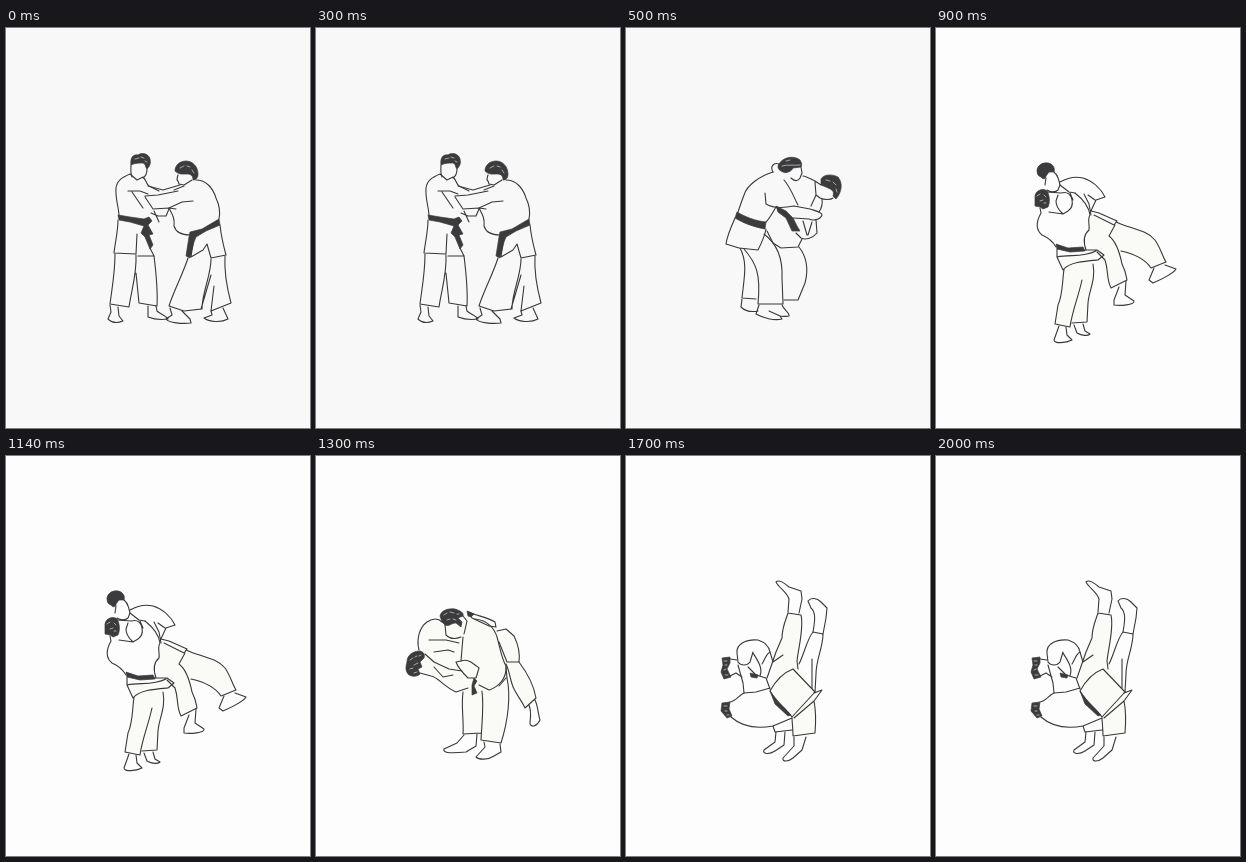
Animation, 304 px wide and 400 px high, one loop 2200 ms. Source, as an HTML page:

```html
<!DOCTYPE html>
<html lang="en">
<head>
<meta charset="utf-8">
<title>Judo throw</title>
<style>
html, body { margin: 0; width: 100%; height: 100%; overflow: hidden; background: #f8f8f8; }
svg { display: block; width: 100%; height: 100%; }
.line { fill: none; stroke: #38383a; stroke-width: 1.1; stroke-linecap: round; stroke-linejoin: round; }
.ink { fill: #3b3b3e; stroke: #3b3b3e; stroke-width: .7; stroke-linejoin: round; }
.tint { fill: #fafaf6; }
.fleck { fill: none; stroke: #c4c4c4; stroke-width: .8; stroke-linecap: round; }
</style>
</head>
<body>
<svg id="stage" viewBox="0 0 304 400"></svg>
<script>
const NS = 'http://www.w3.org/2000/svg';
const stage = document.getElementById('stage');

// Each pose: hold time, paper colour, then [style, path] strokes from back to front.
const poses = [
  { hold: 500, paper: '#f8f8f8', art: [
    // left fighter
    ['ink', 'M125 137C124 130 127 126 132 127C136 124 143 126 144 131C145 135 144 138 141 141C139 139 140 136 137 135C133 135 129 135 125 137Z'],
    ['fleck', 'M129 131l4 -1M135 129l3 1M139 133l2 1'],
    ['line', 'M125 137C125 142 124 145 126 149M141 141C141 145 140 148 137 150'],
    ['line', 'M124 146C117 149 111 152 110 160C109 170 113 180 113 188M124 146L131 152L137 149C141 153 140 156 143 158L153 163'],
    ['line', 'M122 163L134 163L142 166M126 164L137 180M142 158L157 162L174 157M139 168L152 167L172 163M139 169L147 181L163 180L170 181M148 183L153 194M145 185L152 188L160 188L163 181'],
    ['ink', 'M112 187L124 189L138 191L143 189L146 193L142 197L147 206L143 207L147 217L144 221L139 209L135 205L138 198L124 194L113 192Z'],
    ['line', 'M112 192C112 204 109 215 108 225L130 226L131 206M144 220L148 228L132 228'],
    ['line', 'M109 226C109 245 106 260 104 276L123 279C125 264 131 246 130 227M130 245L133 275L151 278C152 260 150 244 148 228'],
    ['line', 'M104 277L105 284L102 291C106 295 112 295 117 293L113 288L112 279M142 278L142 289C147 291 155 292 162 291C161 288 154 286 151 283L150 278'],
    // right fighter
    ['ink', 'M169 143C169 137 174 133 180 133C187 133 192 139 192 146C192 150 190 152 187 152C187 148 185 146 181 146C177 146 173 147 169 143Z'],
    ['fleck', 'M174 140l4 -2M181 138l3 1M186 142l2 3'],
    ['line', 'M172 147C171 151 170 152 172 153L173 156L178 157L186 152M190 152C200 152 207 160 210 170C214 178 214 186 213 191'],
    ['line', 'M178 158L168 162M187 173L176 174L163 180C166 186 169 190 168 198C170 205 177 207 184 207'],
    ['ink', 'M213 191L214 197L200 203L190 209L188 214L184 230L180 228L183 209L184 204L196 201Z'],
    ['line', 'M187 214L185 229L197 222L201 216L205 230L220 227C217 216 215 207 214 197'],
    ['line', 'M182 230C177 246 168 262 163 278L178 283L196 281C196 264 205 248 205 231M205 247L195 281L178 283M219 228C218 244 221 260 225 275L205 283L208 258'],
    ['line', 'M164 280L166 287L160 291C163 295 176 296 185 295L184 291L176 283M205 283L206 287L198 290C203 294 215 295 222 291L217 280']
  ] },
  { hold: 400, paper: '#f8f8f8', art: [
    ['ink', 'M153 136C157 129 168 127 174 132C176 135 176 138 175 139L167 140C166 143 160 146 157 144C152 142 151 139 153 136Z'],
    ['fleck', 'M156 138C162 136 168 138 174 137M160 133l4 -1'],
    ['ink', 'M195 151C198 146 206 146 212 149C217 155 216 164 210 171L207 168C209 162 204 161 200 159L195 157Z'],
    ['fleck', 'M200 152l4 1M207 154l3 3M210 161l1 3'],
    ['line', 'M175 139L176 145L174 150C172 154 168 153 165 150M153 136C147 134 144 139 147 144'],
    ['line', 'M195 157L189 153C183 150 179 148 177 148M207 170C205 172 198 172 194 170L190 167L185 178M189 154L190 167'],
    ['line', 'M147 144C134 148 121 157 118 167C115 175 113 181 111 187M158 152C165 160 168 170 172 177'],
    ['line', 'M139 165L140 176C148 181 158 180 168 178L184 181C190 183 196 184 196 187C194 192 187 193 183 191L167 190'],
    ['line', 'M196 171C197 177 195 181 193 184M190 192L191 205C186 211 179 212 175 210L170 205M177 193L181 207M186 194L182 207'],
    ['ink', 'M111 184C119 189 130 193 140 194L139 201C128 199 117 195 109 190Z'],
    ['ink', 'M150 178L160 183L167 190L171 198L174 203L166 203L160 190L152 184Z'],
    ['line', 'M109 190C105 199 101 208 100 216L113 220L132 222C136 214 139 207 140 201M140 194C144 190 147 184 150 179M141 203L147 215L155 220L172 219L176 211'],
    ['line', 'M114 220C122 235 118 250 116 270L130 271M118 221C130 235 135 245 132 276M138 206C150 215 157 230 156 250L157 276L132 276'],
    ['line', 'M173 219C180 228 183 240 179 255L172 272L158 272'],
    ['line', 'M116 271L115 279C120 284 127 284 132 283M133 277L130 286C137 290 148 293 156 291L154 288L143 283M156 277C158 282 164 285 163 288C160 289 156 288 154 288']
  ] },
  { hold: 400, paper: '#fdfdfd', art: [
    ['tint', 'M154 187L178 194C195 200 215 205 220 214L230 234L215 240C205 230 195 225 183 222L191 252L175 260L152 212Z'],
    ['tint', 'M121 230L160 222L158 238L151 294L119 296L127 242Z'],
    // thrown fighter
    ['ink', 'M101 142C102 136 109 133 115 136C118 138 119 141 118 144L113 144L110 148C110 151 107 152 105 149C102 148 101 146 101 142Z'],
    ['line', 'M118 144C122 147 122 150 123 153L124 157L122 162C119 165 114 164 111 162M110 150L109 157'],
    ['line', 'M124 154C131 150 139 148 147 150C157 153 165 161 169 169L160 172L154 185M124 157L133 164L139 165M152 167L159 172M148 166L153 176L155 187'],
    ['line', 'M155 183L163 185L181 193M158 187L178 197L181 193'],
    ['line', 'M180 194C195 201 211 202 219 212C224 219 226 227 230 234L215 240C209 231 199 226 185 223'],
    ['line', 'M179 197L173 208C181 214 184 226 186 236C190 244 190 247 191 252L175 260C170 250 173 244 169 232L161 224'],
    ['line', 'M229 237L240 241C237 246 226 251 217 255L213 252L218 240M190 253L189 267L198 273C199 277 184 278 178 277L178 272L183 259'],
    // standing fighter
    ['ink', 'M99 168C100 162 107 160 111 163C114 168 114 175 112 179L107 181L104 179L99 178Z'],
    ['fleck', 'M101 168l3 -2M104 173l3 -1M108 167l2 2M108 175l2 0'],
    ['line', 'M111 164L125 165C132 163 135 167 136 172C137 177 135 181 132 183L127 186L113 184M122 167L120 173C120 180 124 183 127 186M134 165L137 172'],
    ['line', 'M104 180L105 185C100 194 100 202 106 207C113 210 117 214 120 219M139 165C148 172 153 180 154 187C151 192 154 197 153 202C148 206 147 213 150 222'],
    ['ink', 'M120 216L132 220L147 219L149 223L134 224L121 221Z'],
    ['line', 'M121 221L121 229L127 242C133 234 150 233 162 232L168 227L161 222L149 222M121 229C134 226 146 230 160 223'],
    ['line', 'M128 241C126 255 127 266 122 277L119 296L134 299C136 284 142 270 146 252M157 236C160 252 153 262 152 275L151 294L136 295'],
    ['line', 'M123 298L118 312C118 316 130 315 136 312L131 307L130 299M138 297L141 305C146 308 152 308 154 306L149 303L147 296']
  ] },
  { hold: 400, paper: '#fdfdfd', art: [
    ['tint', 'M103 194L105 175L118 163L126 168L159 158L177 170L184 174L198 180L204 206L220 242L209 252L194 216L185 287L165 284L165 277L147 278L146 236L104 215Z'],
    ['ink', 'M124 160C125 155 131 152 139 153C145 155 148 157 147 160L142 162L146 166L145 171L140 167C135 167 133 171 129 169L126 166Z'],
    ['fleck', 'M128 159l3 -2M134 156l4 1M131 164l3 -1M137 163l3 1M141 158l2 0'],
    ['ink', 'M91 206C91 199 97 195 104 195C108 196 109 199 108 202L104 206L106 211L102 213L104 218C101 221 95 221 92 218C89 214 90 210 91 206Z'],
    ['fleck', 'M94 204l3 -2M98 209l4 -2M94 213l3 -1M103 200l2 -1M98 217l3 -1M99 201l2 -1'],
    ['line', 'M103 194C100 182 104 171 111 166C117 162 122 162 126 166M129 169L130 179C134 183 140 183 145 181M147 160L151 165L148 178'],
    ['line', 'M153 156C161 160 171 161 179 166L180 171L173 170L156 162Z'],
    ['ink', 'M151 155L158 158L155 161L152 160Z'],
    ['line', 'M159 163C170 164 178 171 181 181C184 191 185 201 190 210C191 223 182 231 173 234L163 229M147 181L145 205'],
    ['line', 'M181 175L190 173L198 180C203 190 204 198 203 206L191 206L183 186'],
    ['line', 'M109 198L118 206L133 213L146 215M104 217L115 220C122 221 128 231 140 236L152 232M113 184L130 184L143 187M118 196L132 194L138 196M118 211L127 221L137 219'],
    ['line', 'M145 205C152 202 158 208 163 212L160 222L152 222C148 218 142 212 140 206Z'],
    ['ink', 'M158 222L161 225L158 230L161 237L156 239L156 229Z'],
    ['line', 'M147 236C145 250 148 265 147 278L165 277M166 235C168 250 166 265 165 284L185 287C192 265 195 240 191 222L190 211M190 222L183 230'],
    ['line', 'M190 208C194 216 194 225 198 233C202 241 206 245 209 252L220 242C218 230 212 218 203 206M213 249C216 257 214 262 214 268C216 272 221 270 224 264C222 258 222 250 219 244'],
    ['line', 'M148 279L141 287L128 293C126 298 140 297 150 296L160 290L161 278M168 286L169 291L160 301C163 304 172 304 178 300L185 296L184 288']
  ] },
  { hold: 500, paper: '#fdfdfd', art: [
    ['tint', 'M162 157L175 157L171 208L189 236L189 277L167 280L166 261L144 234L147 205Z'],
    // legs in the air
    ['line', 'M150 126C153 123 158 127 163 131L175 135L176 143L173 157M150 126C153 132 161 136 163 143L162 156'],
    ['line', 'M182 145C185 141 191 142 195 146L201 152L200 162L197 178M182 145L185 152C190 156 189 165 187 176'],
    ['line', 'M162 157C159 166 156 172 156 182L150 196L141 222M162 157L175 159C178 172 173 188 171 205L172 213'],
    ['line', 'M187 176C181 183 179 196 173 208M187 176L197 178C197 192 190 203 190 218L189 236M186 203L186 232'],
    // heads and arms
    ['line', 'M111 197C110 188 120 183 132 184C138 186 143 190 144 196C139 199 139 204 136 208M111 197L112 206C115 210 121 210 124 206L127 196'],
    ['ink', 'M96 202L104 201L104 207L101 213L105 221L98 223L95 216L97 209Z'],
    ['ink', 'M96 247L104 246L103 253L106 260L101 262L95 255Z'],
    ['fleck', 'M98 205l3 0M99 209l2 0M98 214l2 -1M99 219l3 0M98 250l3 0M99 255l2 0M101 259l2 0'],
    ['line', 'M104 203L111 204M104 220L110 217L116 221M112 209L117 227L118 237L130 236L144 232M127 197C132 205 137 212 134 220M122 211L130 219L140 222L144 233M144 196L147 206L157 199'],
    ['ink', 'M124 217L132 219L131 222L125 221Z'],
    ['line', 'M104 246C110 245 113 239 118 237M105 261C115 270 130 273 147 270L166 262'],
    // jacket and standing legs
    ['line', 'M144 235C150 224 159 216 167 213L189 236L166 261C160 252 151 247 144 235Z'],
    ['ink', 'M144 235L151 245L165 259L162 260L149 248Z'],
    ['line', 'M188 237L196 234L188 245L168 262M188 245C190 255 190 265 189 277L167 280C167 272 166 266 166 262M147 270L149 276L166 274'],
    ['line', 'M150 276L149 286L138 294C136 298 143 299 149 295L158 289L159 276M168 281L168 290L157 302C156 306 162 306 167 302L176 294L180 281']
  ] }
];

function node(name, attrs, parent) {
  const el = document.createElementNS(NS, name);
  for (const key in attrs) el.setAttribute(key, attrs[key]);
  return parent.appendChild(el);
}

let loop = 0;
for (const pose of poses) {
  pose.end = loop += pose.hold;
  pose.group = node('g', { visibility: 'hidden' }, stage);
  node('rect', { width: 304, height: 400, fill: pose.paper }, pose.group);
  for (const [style, d] of pose.art) node('path', { class: style, d }, pose.group);
}

let shown = null;
function draw(ms) {
  const t = ms % loop;
  const pose = poses.find(p => t < p.end);
  if (pose === shown) return;
  if (shown) shown.group.setAttribute('visibility', 'hidden');
  pose.group.setAttribute('visibility', 'visible');
  shown = pose;
}

const start = performance.now();
function tick() {
  draw(performance.now() - start);
  requestAnimationFrame(tick);
}
tick();
</script>
</body>
</html>
```
